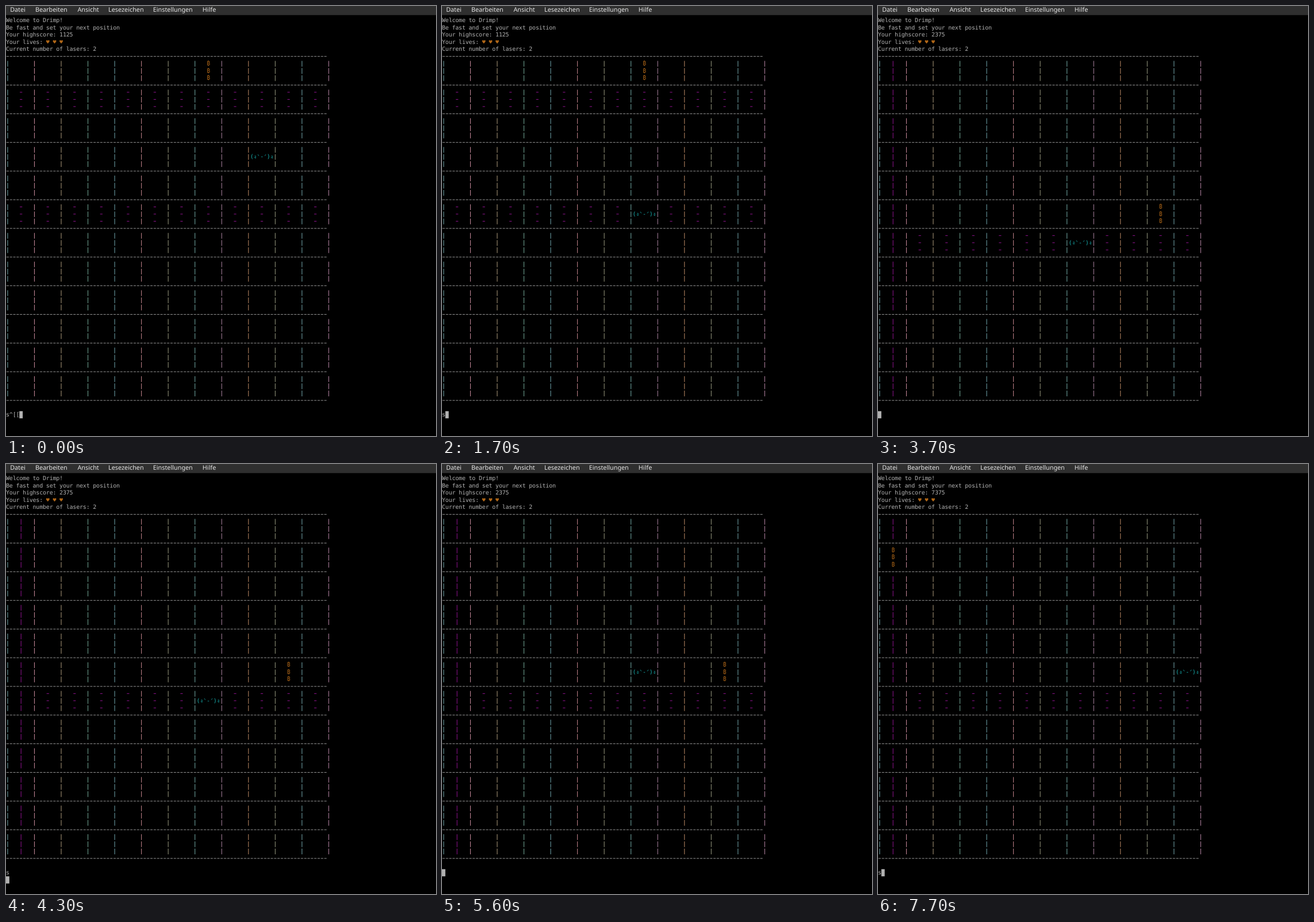
Animation of 748 by 748 pixels, one loop 8 s. Source, as an HTML page:

```html
<!DOCTYPE html>
<html lang="en">
<head>
<meta charset="utf-8">
<title>Terminal game</title>
<style>
html, body { margin: 0; width: 100%; height: 100%; overflow: hidden; background: #000; }
svg { display: block; width: 100vw; height: 100vh; }
text { white-space: pre; text-rendering: geometricPrecision; }
.mono { font: 12px "DejaVu Sans Mono", "Noto Sans", monospace; letter-spacing: -.224px; }
.menu { font: 13px "Noto Sans", sans-serif; fill: #e6e6e6; }
</style>
</head>
<body>
<svg id="stage" viewBox="0 0 900 900"></svg>
<script>
const NS = 'http://www.w3.org/2000/svg';
const CW = 7, CH = 15, TOP = 23, BASE = 11, N = 12, LOOP = 8000;
const GREY = '#b2b2b2', RED = '#b21818', PINK = '#b218b2', CYAN = '#18b2b2', ORANGE = '#b26818';
// Subpixel tints of the grid bars, left to right
const TINTS = ['#72a6aa', '#c48799', '#a8977a', '#70a391', '#6ea3a9', '#c08289', '#96967c',
  '#70a6a2', '#a8809c', '#b88764', '#94967e', '#70a3a9', '#b081a0'];
const stage = document.getElementById('stage');

function add(parent, tag, attrs, content) {
  const el = document.createElementNS(NS, tag);
  for (const key in attrs) el.setAttribute(key, attrs[key]);
  if (content !== undefined) el.textContent = content;
  parent.appendChild(el);
  return el;
}

const lineTop = line => TOP + line * CH;
const cellLine = row => 6 + row * 4;

function write(parent, col, line, str, fill = GREY) {
  return add(parent, 'text', { class: 'mono', x: col * CW, y: lineTop(line) + BASE, fill }, str);
}

function dashes(parent, col, line, count, stroke) {
  const y = lineTop(line) + BASE - 3.5, x = col * CW + 1;
  add(parent, 'line', { x1: x, x2: x + count * CW - 2, y1: y, y2: y, stroke, 'stroke-dasharray': '5 2' });
}

function bars(parent, col, row, stroke, width) {
  const x = col * CW + 3.5, y = lineTop(cellLine(row)) + 2;
  add(parent, 'line', { x1: x, x2: x, y1: y, y2: y + 42, stroke,
    'stroke-width': width, 'stroke-dasharray': '12 3' });
}

function eachCell(fn) {
  for (let row = 0; row < N; row++) for (let col = 0; col < N; col++) fn(col, row);
}

// Fixed parts
add(stage, 'rect', { width: 900, height: 900, fill: '#000' });
add(stage, 'rect', { width: 900, height: 19, fill: '#2f2f2f' });
[['Datei', 8.6], ['Bearbeiten', 61.3], ['Ansicht', 149.7], ['Lesezeichen', 214.3],
  ['Einstellungen', 307.8], ['Hilfe', 411.3]]
  .forEach(([str, x]) => add(stage, 'text', { class: 'menu', x, y: 11.5 }, str));
write(stage, 0, 0, 'Welcome to Drimp!');
write(stage, 0, 1, 'Be fast and set your next position');
const score = write(stage, 0, 2, '');
write(stage, 0, 3, 'Your lives:');
write(stage, 12, 3, '♥ ♥ ♥', ORANGE);
write(stage, 0, 4, 'Current number of lasers: 2');
for (let row = 0; row <= N; row++) dashes(stage, 0, 5 + row * 4, 96, GREY);
for (let row = 0; row < N; row++) TINTS.forEach((tint, k) => bars(stage, k * 8, row, tint, 1.25));

// One group per laser kind and cell
const across = {}, down = {}, burn = {};
eachCell((col, row) => {
  const id = col + ',' + row, at = cellLine(row);
  if (row === 1 || row === 5 || row === 6) {
    across[id] = add(stage, 'g', {});
    burn[id] = add(stage, 'g', {});
    for (let i = 0; i < 3; i++) {
      dashes(across[id], col * 8 + 4, at + i, 1, PINK);
      dashes(burn[id], col * 8 + 3, at + i, 3, RED);
    }
  }
  if (col === 0) {
    down[id] = add(stage, 'g', {});
    bars(down[id], 4, row, PINK, 1);
  }
});

const coin = add(stage, 'g', {});
for (let i = 0; i < 3; i++) {
  add(coin, 'text', { class: 'mono', x: 3.5, y: i * CH + BASE, fill: ORANGE, 'text-anchor': 'middle' }, '₿');
}

const face = add(stage, 'g', { fill: CYAN });
[['(', 0], ['-', 3], [')', 5]]
  .forEach(([ch, col]) => add(face, 'text', { class: 'mono', x: col * CW, y: BASE }, ch));
const fist = x => `M${x + 2.6} 5.8h1.8v5l-2.8-2.4`;
add(face, 'path', { d: fist(7) + fist(42) + 'M16.2 2.6l2 3.2M32.8 2.6l-2 3.2',
  fill: 'none', stroke: CYAN, 'stroke-width': .95 });

const typed = write(stage, 0, 55, '');
const cursor = add(stage, 'rect', { width: CW, height: CH, fill: GREY });

// Each step: time in ms and what changes then
const steps = [
  [0, { x: 9, y: 3, input: 's^[[', score: 1125, coin: [7, 0], rows: [1, 5], column: false, hot: false, enter: false }],
  [400, { y: 4, input: '' }],
  [800, { input: 'a' }],
  [900, { x: 8, input: '' }],
  [1100, { input: 'a' }],
  [1200, { x: 7, input: '' }],
  [1300, { input: 's' }],
  [1500, { y: 5, input: '' }],
  [1700, { input: 's' }],
  [2000, { y: 6, input: '' }],
  [2200, { hot: true }],
  [3700, { hot: false, rows: [6], column: true, score: 2375, coin: [10, 5] }],
  [3900, { input: 's' }],
  [4300, { enter: true }],
  [4400, { y: 7, input: '', enter: false }],
  [5100, { input: 'w' }],
  [5400, { y: 6, input: '' }],
  [5600, { y: 5 }],
  [6200, { x: 8 }],
  [6400, { x: 9 }],
  [6600, { x: 10 }],
  [6800, { input: 'd' }],
  [7100, { input: 'dd' }],
  [7400, { x: 11, input: '', score: 7375, coin: [0, 1] }],
  [7700, { input: 's' }]
];

const show = (el, on) => { if (el) el.style.display = on ? '' : 'none'; };
const place = (el, col, line) => el.setAttribute('transform', `translate(${col * CW} ${lineTop(line)})`);

function render(t) {
  const s = Object.assign({}, ...steps.filter(([at]) => at <= t).map(step => step[1]));
  const [cx, cy] = s.coin;
  const onCoin = s.x === cx && s.y === cy;
  eachCell((col, row) => {
    const id = col + ',' + row;
    const free = !(col === s.x && row === s.y) && !(col === cx && row === cy);
    const vertical = s.column && col === 0;
    const lit = free && !vertical && s.rows.includes(row);
    show(across[id], lit && !s.hot);
    show(burn[id], lit && s.hot);
    show(down[id], free && vertical);
  });
  show(coin, !onCoin);
  place(coin, cx * 8 + 4, cellLine(cy));
  place(face, s.x * 8 + 1, cellLine(s.y) + 1);
  score.textContent = 'Your highscore: ' + s.score;
  typed.textContent = s.input;
  place(cursor, s.enter ? 0 : s.input.length, s.enter ? 56 : 55);
}

const start = performance.now();
function tick() {
  render((performance.now() - start) % LOOP);
  requestAnimationFrame(tick);
}
tick();
</script>
</body>
</html>
```
